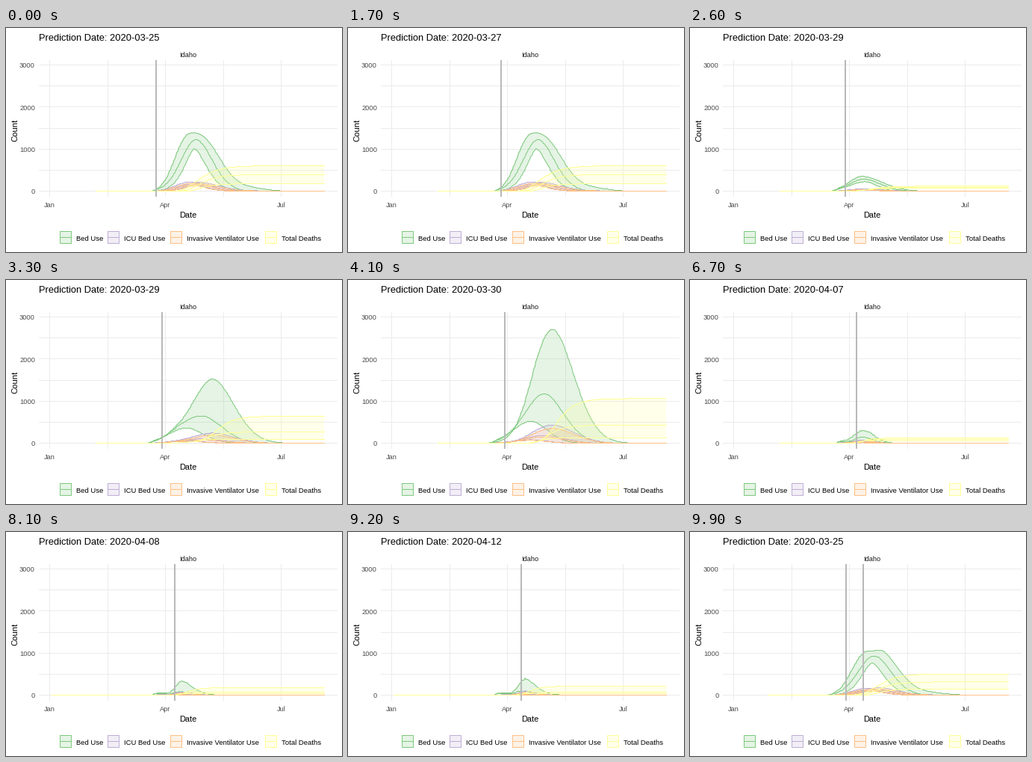
These frames come from a looping animation (450x300 px, 10 s). A matplotlib script:

```python
import numpy as np
import matplotlib.pyplot as plt
from matplotlib.animation import FuncAnimation
from matplotlib.patches import Polygon, Rectangle

W, H, DPI = 450, 300, 100
PX = 72 / DPI                      # one pixel in points
FRAMES, INTERVAL, STEPS = 100, 100, 4
LEFT, RIGHT, TOP, BOTTOM = 44, 444, 43, 226
SAMPLES, LAST_DAY = 215, 216       # days count from 1 January
COLORS = ["#7FC97F", "#BEAED4", "#FDC086", "#FFFF99"]
LABELS = ["Bed Use", "ICU Bed Use", "Invasive Ventilator Use", "Total Deaths"]

plt.rcParams["font.family"] = "Liberation Sans"
rng = np.random.RandomState(4)


def px(day):
    return 58.05 + 1.705 * day


def py(count):
    return 218.7 - 0.0564 * count


# ---- forecasts: lower, mean and upper curve of each series -----------
def bell(center, height, left, right, power=1.9, start=75):
    """Lopsided bell; left and right are the half widths at half height."""
    def curve(d):
        half = np.where(d < center, left, right)
        ramp = np.clip((d - start) / 8, 0, 1)
        return height * ramp * 0.5 ** (np.abs(d - center) / half) ** power
    return curve


def total(final, center, width):
    """Cumulative count that levels off at its final value."""
    return lambda d: final * np.exp(-np.exp(-(d - center) / width))


def forecast(beds, deaths, start=36.5, icu=0.16, vent=0.13, rough=0, base=None):
    d = np.linspace(start, LAST_DAY, SAMPLES)
    bed = np.array([f(d) for f in beds])
    if base:                       # counts shared by all three curves
        bed += base(d)
    bed *= 1 + rough * rng.uniform(-1, 1, bed.shape)
    return d, np.array([bed, bed * icu, bed * vent, [f(d) for f in deaths]])


early = forecast(
    [bell(114, 1010, 9.3, 11, 1.6, 80), bell(115, 1225, 13.5, 15.3, 1.9, 77),
     lambda d: bell(112.5, 1385, 15, 23, 2.4, 77)(d) + bell(158, 75, 14, 14)(d)],
    [total(175, 118, 7), total(395, 116.5, 9), total(605, 115, 10)])

mar29 = forecast(
    [bell(103.5, 226, 14.5, 11), bell(102.5, 290, 13, 15), bell(101, 352, 12, 19)],
    [total(70, 102, 8), total(95, 104, 9), total(122, 106, 10)], vent=0.11)

mar30 = forecast(
    [bell(110.8, 540, 17, 15), bell(121.4, 1190, 18.5, 18),
     bell(128.5, 2961, 17.3, 19.8)],
    [total(130, 115, 7), total(440, 123, 8), total(1160, 130, 8.5)])


def april_first(shift):
    return forecast(
        [bell(106.2 + shift, 495, 14.5, 13), bell(115.6 + shift, 1180, 16, 16.5),
         bell(116.2 + shift, 2560, 12.6, 17.3)],
        [total(140, 113 + shift, 6), total(390, 117 + shift, 6),
         total(760, 117.5 + shift, 6.5)])


apr05 = forecast(
    [bell(100, 70, 7, 9), bell(101.5, 150, 7.5, 9.5), bell(102, 300, 8.5, 10)],
    [total(62, 97, 4), total(88, 99, 4), total(120, 101, 4)],
    icu=0.25, vent=0.18, rough=0.06, base=bell(85, 35, 3, 4))


def late(day):
    """Peak and deaths grow a little with every later prediction."""
    gain = 1 - 0.045 * (102 - day)
    center = 105 - 0.25 * (102 - day)
    return forecast(
        [bell(97, 30 * gain, 4, 10), bell(102, 100 * gain, 6, 11),
         bell(center, 400 * gain, 5.8, 9.5, 1.6)],
        [total(45, 100, 4), total(80, 102, 5), total(212 * gain, 107, 6)],
        start=2, icu=0.25, vent=0.17, rough=0.05, base=bell(85.5, 45, 4, 6, 4))


april = april_first(0)
STATES = [(84, early), (85, early), (86, early), (88, mar29), (89, mar30),
          (90, april_first(0.8)), (91, april), (95, apr05), (97, apr05),
          (98, late(98)), (100, late(100)), (102, late(102))]


def phase(frame):
    """Index of the current state and progress towards the next one."""
    for k in range(len(STATES)):
        start = min(5 + 9 * k, 9 + 8 * k)
        if frame < start + STEPS - 1:
            return k, max(0, frame - start + 1) / STEPS
    return 0, 0


def date(day):
    return f"2020-04-{day - 90:02d}" if day > 90 else f"2020-03-{day - 59:02d}"


# ---- fixed parts -----------------------------------------------------
fig = plt.figure(figsize=(W / DPI, H / DPI), dpi=DPI, facecolor="white")
ax = fig.add_axes([0, 0, 1, 1])
ax.set(xlim=(0, W), ylim=(H, 0))
ax.set_axis_off()


def block(x, y, w, h, color, z):
    return ax.add_patch(Rectangle((x, y), w, h, fc=color, lw=0, zorder=z,
                                  antialiased=False))


def label(x, y, text, size=9.3, color="black", ha="left", **kw):
    return ax.text(x, y, text, fontsize=size * PX, color=color, ha=ha,
                   va=kw.pop("va", "baseline"), **kw)


def stroke(xs, ys, color, z):
    return ax.plot(xs, ys, color=color, lw=PX, zorder=z, snap=False,
                   solid_capstyle="projecting", solid_joinstyle="miter")[0]


for count in range(0, 3001, 500):
    block(LEFT, int(py(count)), RIGHT - LEFT, 1, "#EBEBEB", 0)
for day in (0, 45.5, 91, 136.5, 182):
    block(round(px(day)), TOP, 1, BOTTOM - TOP, "#EBEBEB", 0)

for count in range(0, 3001, 1000):
    label(39, py(count) + 3.6, str(count), color="#4D4D4D", ha="right")
for day, month in ((0, "Jan"), (91, "Apr"), (182, "Jul")):
    label(px(day), 240, month, color="#4D4D4D", ha="center")
label(243.5, 39, "Idaho", color="#1A1A1A", ha="center")
label(244, 254, "Date", 11, ha="center")
label(17, 136.5, "Count", 11.2, ha="right", va="center", rotation=90)
title = label(44, 17, "", 12.9)

for x, name, color in zip((72, 136, 220, 347), LABELS, COLORS):
    block(x, 272, 16, 17, color, 1).set_alpha(0.2)
    a, b, top, bottom = x + .5, x + 15.5, 272.5, 288.5
    stroke([a, b, b, a, a], [top, top, bottom, bottom, top], color, 2)
    stroke([a + 1, b - 1], [280.5, 280.5], color, 2)
    label(x + 22, 285, name, 9.5)

# ---- moving parts ----------------------------------------------------
bands, lines = [], []
for i, color in enumerate(COLORS):
    bands.append(ax.add_patch(Polygon([(0, 0), (0, 0)], fc=color, alpha=0.2, lw=0,
                                      zorder=3 + i * 0.1, antialiased=False)))
    lines.append([stroke([], [], color, 3.05 + i * 0.1) for _ in range(3)])
marker = block(0, TOP, 2, BOTTOM - TOP, "#B8B8B8", 5)
leftover = block(0, TOP, 2, BOTTOM - TOP, "#B8B8B8", 5)


def place(bar, day):
    bar.set_x(round(px(day)) - 1)


def draw(frame):
    k, t = phase(frame)
    day_a, (da, va) = STATES[k]
    day_b, (db, vb) = STATES[(k + 1) % len(STATES)]
    title.set_text("Prediction Date: " + date(day_b if t > 0.5 else day_a))

    place(marker, day_a + (day_b - day_a) * t)
    place(leftover, day_a)
    # the longer series leaves its own marker behind until the move ends
    leftover.set_visible(t > 0 and da[0] < db[0])

    # whole pixels keep the thin lines crisp
    x = np.floor(px(da + (db - da) * t))
    y = np.floor(py(va + (vb - va) * t))
    for band, trio, (low, mean, high) in zip(bands, lines, y):
        band.set_xy(np.column_stack([np.r_[x, x[::-1]], np.r_[high, low[::-1]]]))
        for line, ys in zip(trio, (low, mean, high)):
            line.set_data(x + .5, ys + .5)
    return [title, marker, leftover, *bands, *sum(lines, [])]


def init():
    return draw(0)


anim = FuncAnimation(fig, draw, frames=FRAMES, init_func=init, interval=INTERVAL,
                     repeat=True, repeat_delay=0, blit=False)
plt.show()
```
